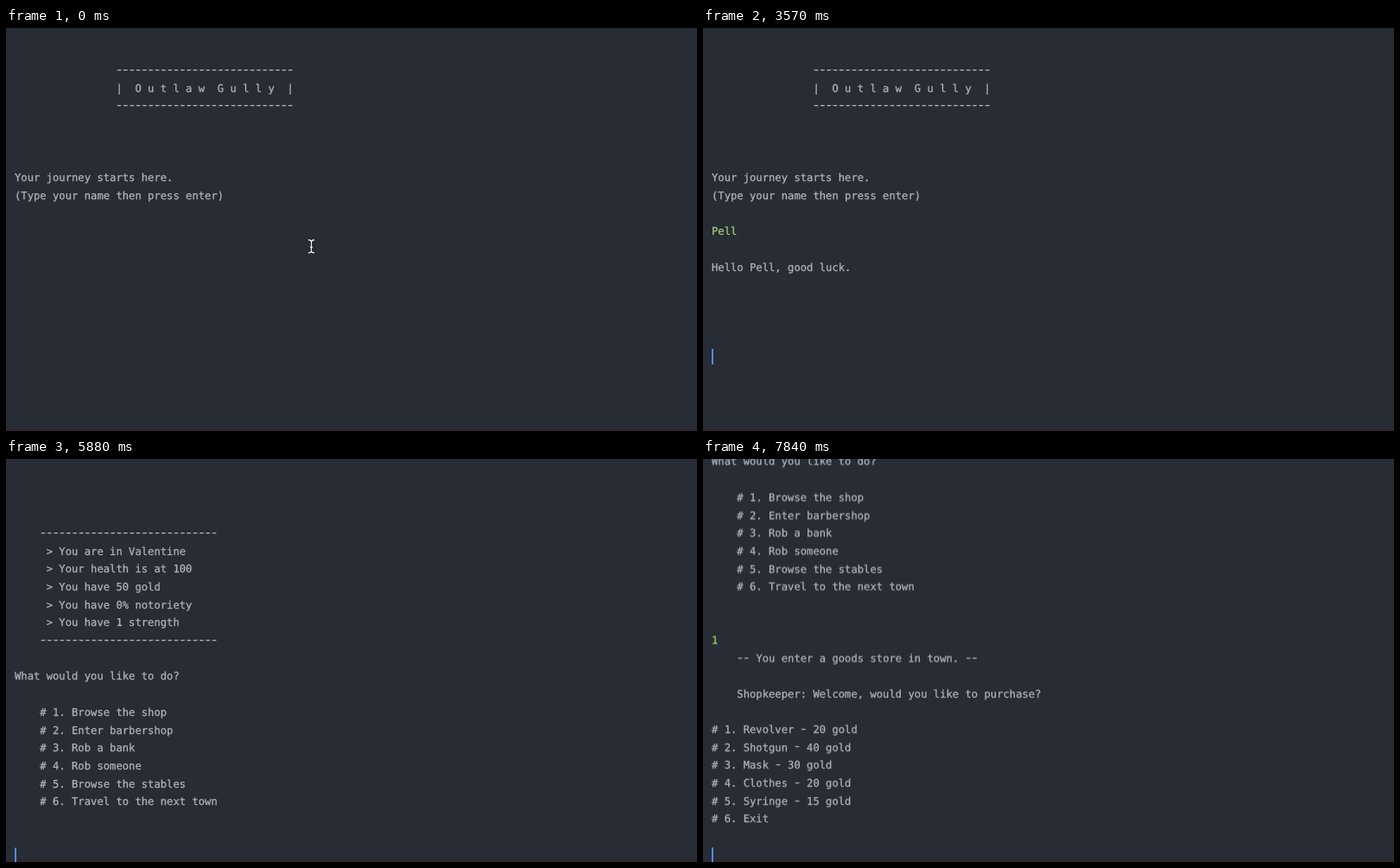
Write an HTML page that moves like this. It is 800x466 px and loops after 8000 ms.

```html
<!DOCTYPE html>
<html lang="en">
<head>
<meta charset="utf-8">
<title>Terminal game</title>
<style>
html, body { margin: 0; width: 100%; height: 100%; overflow: hidden; background: #282c34; }
#stage { position: absolute; left: 0; top: 0; width: 800px; height: 466px; overflow: hidden; background: #282c34; }
#strip { position: absolute; left: 0; bottom: 0; width: 100%; height: 3px; background: #302631; }
#page { position: absolute; left: 10.4px; top: 39.4px; will-change: transform; }
.row {
  position: absolute; left: 0; white-space: pre; color: #afb5bf;
  font: 12.2px/20.7px "DejaVu Sans Mono", "Noto Sans Mono", monospace;
  font-variant-ligatures: none; text-rendering: geometricPrecision;
  -webkit-text-stroke: .25px currentColor;
}
.typed { color: #9fd07a; }
/* short hyphens, widened and raised a little */
.dash { position: relative; top: -1.2px; text-shadow: .9px 0 currentColor, -.9px 0 currentColor; -webkit-text-stroke: 0; }
#caret { position: absolute; width: 2px; height: 17.5px; background: #528bff; }
#mouse { position: absolute; left: 348px; top: 243px; }
</style>
</head>
<body>
<div id="stage">
  <div id="strip"></div>
  <div id="page"><div id="caret"></div></div>
  <svg id="mouse" width="11" height="19" fill="none">
    <defs><path id="beam" d="M2 2 Q5 2 5.5 4 Q6 2 9 2 M5.5 4 V15 M2 17 Q5 17 5.5 15 Q6 17 9 17 M4 10.5 H7"/></defs>
    <use href="#beam" stroke="#111418" stroke-width="3"/>
    <use href="#beam" stroke="#f2f2f2" stroke-width="1.3"/>
  </svg>
</div>
<script>
const LOOP = 8000, FRAME = 70;
const PITCH = 20.7, CHAR = 7.345;
const LAST_ROW = 19.76;            // lowest place of the caret, in rows
const SOLID = 350, BLINK = 490;    // caret rests after a move, then blinks
const NAME = "Pell";
const rule = "-".repeat(28), bar = "=".repeat(27);

// The whole session, one line per row
const lines = `\
                ${rule}
                |  O u t l a w  G u l l y  |
                ${rule}



Your journey starts here.
(Type your name then press enter)

${NAME}

Hello ${NAME}, good luck.




     ${bar}& &${bar}
        You have just been released from jail,
        with just 50 gold to your name you head into town...
     ${bar}===${bar}




    ${rule}
     > You are in Valentine
     > Your health is at 100
     > You have 50 gold
     > You have 0% notoriety
     > You have 1 strength
    ${rule}

What would you like to do?

    # 1. Browse the shop
    # 2. Enter barbershop
    # 3. Rob a bank
    # 4. Rob someone
    # 5. Browse the stables
    # 6. Travel to the next town


1
    -- You enter a goods store in town. --

    Shopkeeper: Welcome, would you like to purchase?

# 1. Revolver - 20 gold
# 2. Shotgun - 40 gold
# 3. Mask - 30 gold
# 4. Clothes - 20 gold
# 5. Syringe - 15 gold
# 6. Exit

`.split("\n");

const nameRow = lines.indexOf(NAME), pickRow = lines.indexOf("1");
const introRow = lines.findIndex(s => s.includes(bar));
const endRow = lines.length - 1;

// Caret moves: everything above the caret is printed, the page scrolls for ms
const moves = [
  { at: -70, row: nameRow },
  ...[1820, 2100, 2520, 2660].map((at, i) => ({ at, row: nameRow, col: i + 1 })),
  { at: 3080, row: nameRow + 1 },
  { at: 3500, row: introRow },
  { at: 3920, row: introRow + 7, ms: 210 },
  { at: 4550, row: pickRow, ms: 70 },
  { at: 7210, row: pickRow, col: 1 },
  { at: 7350, row: endRow, ms: 490 }
];

const $ = id => document.getElementById(id);
const page = $("page"), caret = $("caret"), mouse = $("mouse");
const isTyped = n => n === nameRow || n === pickRow;

const rows = lines.map((text, n) => {
  const el = document.createElement("div");
  el.className = isTyped(n) ? "row typed" : "row";
  el.style.top = n * PITCH + "px";
  el.innerHTML = text.replace(/&/g, "&amp;").replace(/>/g, "&gt;")
    .replace(/-+/g, '<span class="dash">$&</span>');
  page.insertBefore(el, caret);
  return el;
});

const show = (el, on) => { el.style.visibility = on ? "visible" : "hidden"; };
const scrollFor = row => Math.max(0, row - LAST_ROW) * PITCH;
const smooth = u => u * u * (3 - 2 * u);

function draw(time) {
  const t = Math.floor(time / FRAME) * FRAME;
  const i = moves.findLastIndex(m => m.at <= t);
  const { at, row, col = 0, ms = FRAME } = moves[i];
  const age = t - at;

  rows.forEach((el, n) => {
    show(el, n < row || n === row && isTyped(n));
    if (isTyped(n)) el.textContent = n === row ? lines[n].slice(0, col) : lines[n];
  });

  // half a frame ahead only while a one-frame scroll is under way
  const from = scrollFor(moves[Math.max(0, i - 1)].row), to = scrollFor(row);
  const u = ms > FRAME ? age / ms : (age + FRAME / 2) / ms;
  page.style.transform = `translateY(${-(from + (to - from) * smooth(Math.min(1, u)))}px)`;

  const pointing = t < FRAME;
  const lit = age < SOLID || Math.floor((age - SOLID) / BLINK) % 2 === 0;
  show(mouse, pointing);
  show(caret, lit && !pointing);
  caret.style.left = col * CHAR + "px";
  caret.style.top = row * PITCH + 1.2 + "px";
}

const start = performance.now();
function tick() {
  draw((performance.now() - start) % LOOP);
  requestAnimationFrame(tick);
}
tick();
</script>
</body>
</html>
```
